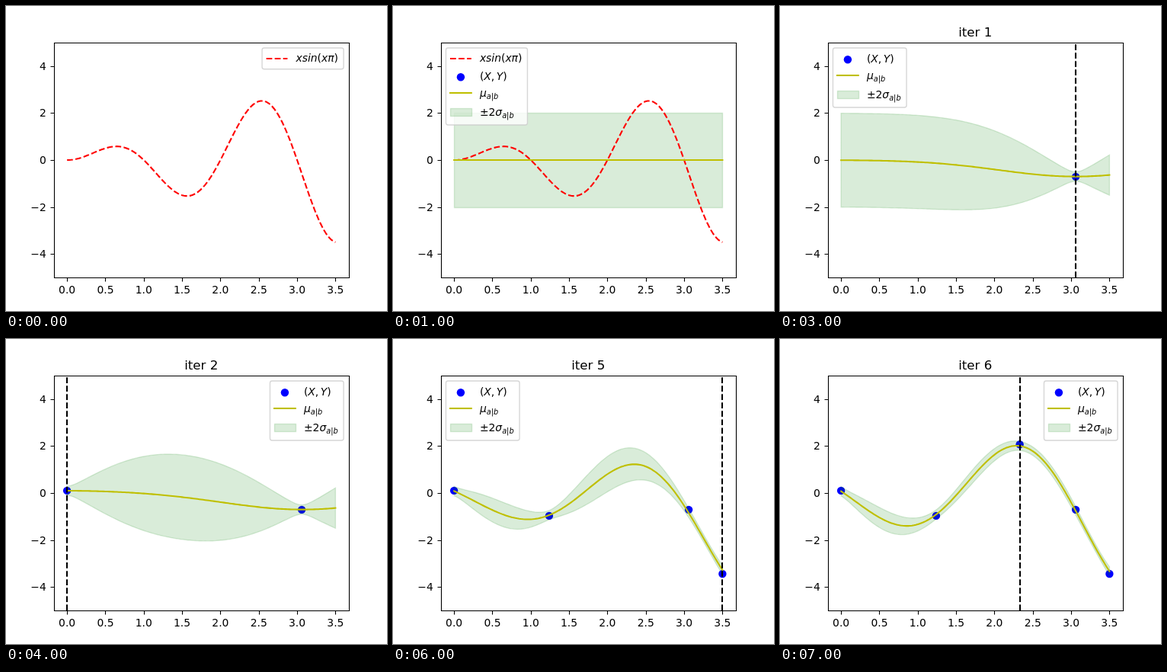
Recreate the animation shown at these times as an HTML page. Size 500 by 400 pixels, loop 8000 ms.

```html
<!DOCTYPE html>
<html lang="en">
<head>
<meta charset="utf-8">
<title>Gaussian process regression</title>
<style>
html, body { margin: 0; width: 100%; height: 100%; overflow: hidden; background: #fff; }
svg { display: block; width: 500px; height: 400px; }
text { font: 13.89px "DejaVu Sans", sans-serif; }
.title { font-size: 16.67px; text-anchor: middle; }
.it { font-style: italic; }
.sub { font-size: 9.72px; }
.line { fill: none; stroke-width: 2.08; stroke-linejoin: round; }
.dash { stroke-dasharray: 7.71 3.33; }
.red { stroke: #f00; }
.mean { stroke: #bfbf00; stroke-linecap: square; }
.mark { stroke: #000; }
.dot { fill: #00f; }
.band { fill: #008000; fill-opacity: .15; stroke: #008000; stroke-opacity: .15; stroke-width: 1.39; }
.box { fill: #fff; fill-opacity: .8; stroke: #ccc; stroke-opacity: .8; stroke-width: 1.39; }
.axes { fill: none; stroke: #000; stroke-width: 1.11; }
.step { visibility: hidden; animation: show 8s step-end infinite; }
@keyframes show {
  0% { visibility: visible; }
  12.5%, 100% { visibility: hidden; }
}
</style>
</head>
<body>
<svg id="plot" viewBox="0 0 500 400"></svg>
<script>
const END = 3.5, N = 140, NOISE = 0.01;
const px = x => 80.11 + x * 100.65;
const py = y => 202 - y * 30.8;
const xs = Array.from({ length: N + 1 }, (_, i) => i * END / N);

const pt = (x, y) => px(x).toFixed(2) + ' ' + py(y).toFixed(2);
const path = (d, cls) => `<path class="${cls}" d="${d}"/>`;
const poly = pts => 'M' + pts.join('L');
const text = (x, y, s, cls = '') => `<text x="${x}" y="${y}" class="${cls}">${s}</text>`;
const dot = (x, y) => `<circle class="dot" cx="${x}" cy="${y}" r="5.2"/>`;

// Gaussian process with a unit RBF kernel
const kernel = (a, b) => Math.exp(-((a - b) ** 2) / 2);

function solve(A, b) {
  const m = A.map((row, i) => [...row, b[i]]), n = b.length;
  for (let i = 0; i < n; i++) {
    for (let r = 0; r < n; r++) {
      if (r === i) continue;
      const f = m[r][i] / m[i][i];
      for (let c = i; c <= n; c++) m[r][c] -= f * m[i][c];
    }
  }
  return m.map((row, i) => row[n] / row[i]);
}

function posterior(data) {
  const X = data.map(p => p[0]);
  const K = X.map((a, i) => X.map((b, j) => kernel(a, b) + (i === j ? NOISE : 0)));
  const alpha = solve(K, data.map(p => p[1]));
  const dotp = (u, v) => u.reduce((s, e, i) => s + e * v[i], 0);
  return xs.map(x => {
    const k = X.map(a => kernel(a, x));
    return { x, mu: dotp(k, alpha), dev: 2 * Math.sqrt(Math.max(0, 1 - dotp(k, solve(K, k)))) };
  });
}

function fit(data) {
  if (!data.length) {
    return path('M80.5 140.5H432.5V264.5H80.5Z', 'band') + path('M80.11 202H432.39', 'line mean');
  }
  const gp = posterior(data);
  const upper = gp.map(p => pt(p.x, p.mu + p.dev));
  const lower = gp.map(p => pt(p.x, p.mu - p.dev)).reverse();
  const mark = Math.round(px(data[data.length - 1][0]));
  return data.map(p => dot(px(p[0]), py(p[1]))).join('')
    + path(poly([...upper, ...lower]) + 'Z', 'band')
    + path(poly(gp.map(p => pt(p.x, p.mu))), 'line mean')
    + path(`M${mark} 356V48`, 'line mark dash');
}

const truth = () => path(poly(xs.map(x => pt(x, x * Math.sin(Math.PI * x)))), 'line red dash');

const sub = '<tspan class="it sub" dy="2.5">a<tspan font-style="normal">|</tspan>b</tspan>';

function legend(right, curve, model) {
  const w = curve ? 107 : 96.6;
  const h = (curve ? 23.1 : 0) + (model ? 78 : 4.7);
  const x = right ? 443.06 - w : 69.44;
  const hx = x + 5.56, tx = x + 44.45;
  let s = `<rect class="box" x="${x}" y="54.94" width="${w}" height="${h}" rx="2.78"/>`;
  if (curve) {
    s += path(`M${hx} 69h27.78`, 'line red dash')
      + text(tx, 73.4, 'xsin<tspan font-style="normal">(</tspan>xπ<tspan font-style="normal">)</tspan>', 'it');
  }
  if (model) {
    const o = curve ? 23 : 0;
    s += dot(hx + 13.89, 70.3 + o)
      + text(tx, 74 + o, '(<tspan class="it">X</tspan>,<tspan class="it" dx="2.5">Y</tspan>)')
      + path(`M${hx} ${91 + o}h27.78`, 'line mean')
      + text(tx, 96 + o, '<tspan class="it">μ</tspan>' + sub)
      + `<rect class="band" x="${Math.round(hx) + .5}" y="${111.5 + o}" width="28" height="10"/>`
      + text(tx, 121 + o, '±2<tspan class="it">σ</tspan>' + sub);
  }
  return s;
}

function axes() {
  let d = 'M63.5 48.5H450.5V356.5H63.5Z', labels = '';
  for (let x = 0; x <= END; x += .5) {
    d += `M${Math.round(px(x)) + .5} 356.5v5`;
    labels += `<text x="${px(x)}" y="377" text-anchor="middle">${x.toFixed(1)}</text>`;
  }
  for (let y = -4; y <= 4; y += 2) {
    d += `M63.5 ${Math.round(py(y)) + .5}h-5`;
    labels += `<text x="52.8" y="${Math.round(py(y)) + 5}" text-anchor="end">${y < 0 ? '−' : ''}${Math.abs(y)}</text>`;
  }
  return path(d, 'axes') + labels;
}

const samples = [[3.06, -.71], [0, .1], [1.24, -.97], [3.5, -3.44], [2.33, 2.07]];
const iter = (label, count, right) =>
  fit(samples.slice(0, count)) + text(256.25, 40, 'iter ' + label, 'title') + legend(right, false, true);

const steps = [
  truth() + legend(true, true, false),
  // the mean line lies over the true curve
  fit([]).replace('<path class="line', truth() + '<path class="line') + legend(false, true, true),
  iter(0, 0, true),
  iter(1, 1, false),
  iter(2, 2, true),
  iter(4, 3, true),
  iter(5, 4, false),
  iter(6, 5, true)
];

const [first, ...rest] = steps.map((s, i) => `<g class="step" style="animation-delay:${i}s">${s}</g>`);
document.getElementById('plot').innerHTML = axes() + first + rest.join('');
</script>
</body>
</html>
```
